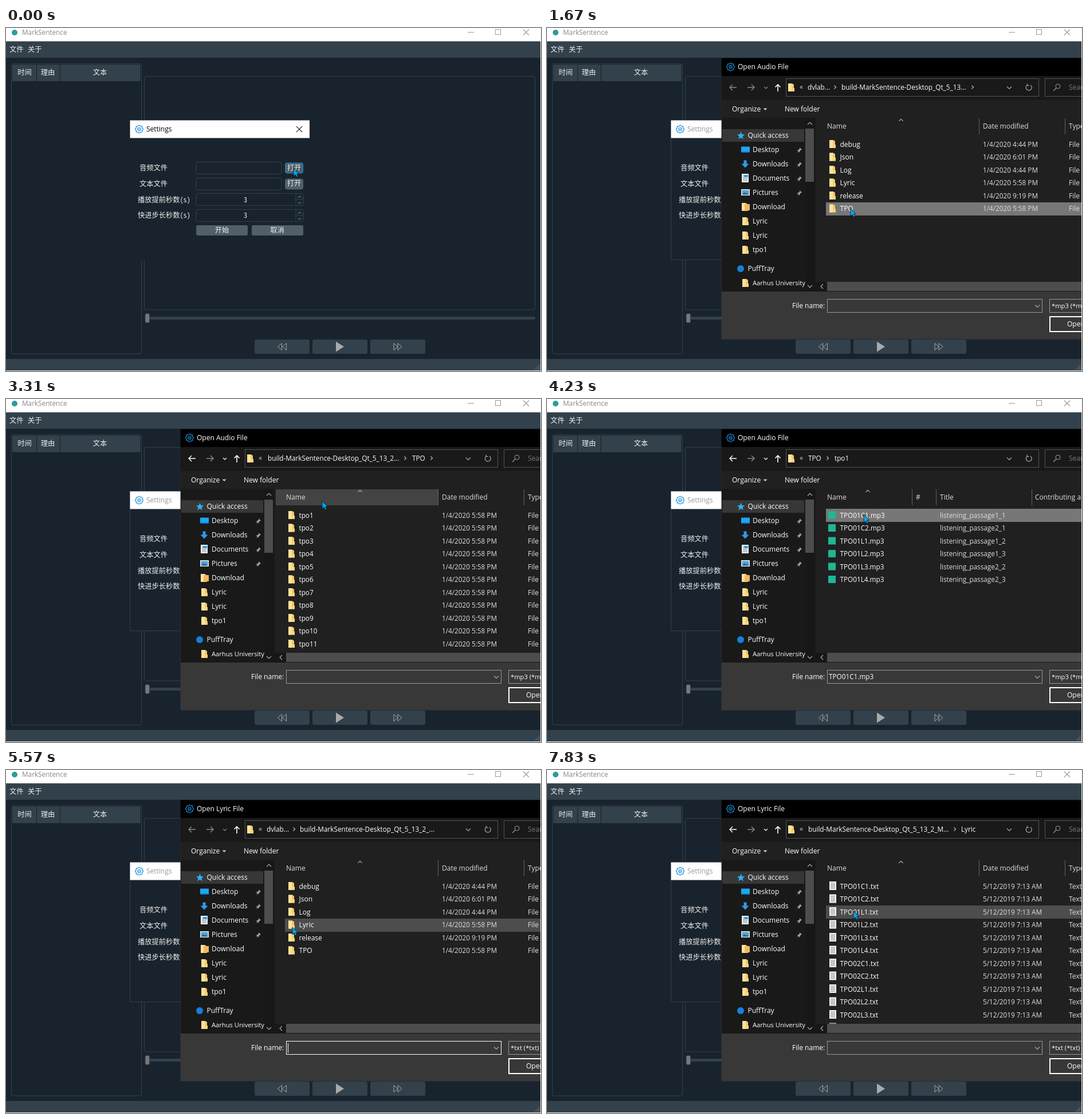
These frames come from a looping animation (934 by 600 pixels, 7.99 s). An HTML page:

```html
<!DOCTYPE html>
<html lang="en">
<head>
<meta charset="utf-8">
<title>MarkSentence</title>
<style>
html, body { margin: 0; width: 100%; height: 100%; overflow: hidden; background: #19232d; }
svg { display: block; }
text { font: 12px "Open Sans", "Noto Sans", sans-serif; fill: #fff; white-space: pre; }
.d { font-size: 11.75px; }
.n { font-size: 11.2px; }
.cjk { font: 12.25px "Noto Sans Mono CJK SC", "Noto Sans CJK SC", "Noto Sans CJK", monospace; fill: #f0f0f0; }
.mid { text-anchor: middle; }
</style>
</head>
<body>
<svg id="stage" width="934" height="600" viewBox="0 0 934 600">
  <defs>
    <clipPath id="list"><rect x="469" y="186" width="464" height="257.5"/></clipPath>
    <clipPath id="nav"><rect x="305" y="158" width="146" height="303"/></clipPath>
    <clipPath id="window"><rect width="933" height="599"/></clipPath>
  </defs>
  <g id="main"></g>
  <g clip-path="url(#window)"><g id="settings"></g><g id="dialog"></g></g>
  <path id="cursor" d="M0 0V13L3 10.3 5.2 14.6 7.6 13.4 5.6 9.3H9.6Z" fill="#00a8f3" stroke="#0b1a26" stroke-width=".8"/>
</svg>
<script>
const LOOP = 7990;
const $ = id => document.getElementById(id);

const text = (x, cy, s, cls = '', fill = '') =>
  `<text x="${x}" y="${Math.round(cy + 4.3)}" class="${cls}"${fill && ` style="fill:${fill}"`}>${s}</text>`;
const box = (x, y, w, h, fill, stroke = 'none', r = 0, sw = 1) =>
  `<rect x="${x}" y="${y}" width="${w}" height="${h}" rx="${r}" fill="${fill}" stroke="${stroke}" stroke-width="${sw}"/>`;
const line = (d, stroke, sw = 1, fill = 'none') =>
  `<path d="${d}" fill="${fill}" stroke="${stroke}" stroke-width="${sw}"/>`;
const shape = (d, fill) => `<path d="${d}" fill="${fill}"/>`;
const cross = (x, y, r, c) => line(`M${x - r} ${y - r}l${2 * r} ${2 * r}m0 ${-2 * r}l${-2 * r} ${2 * r}`, c, 1.1);
const chevron = {
  down: (x, y, c, r = 4) => line(`M${x - r} ${y - r / 2}l${r} ${r}l${r} ${-r}`, c, 1.2),
  up: (x, y, c, r = 4) => line(`M${x - r} ${y + r / 2}l${r} ${-r}l${r} ${r}`, c, 1.2),
  left: (x, y, c, r = 4) => line(`M${x + r / 2} ${y - r}l${-r} ${r}l${r} ${r}`, c, 1.2),
  right: (x, y, c, r = 3) => line(`M${x - r / 2} ${y - r}l${r} ${r}l${-r} ${r}`, c, 1.2)
};

function gear(x, y) {
  let d = '';
  for (let i = 0; i <= 64; i++) {
    const a = i * Math.PI / 32, r = 6.3 + .7 * Math.cos(8 * a);
    d += (i ? 'L' : 'M') + (x + r * Math.cos(a)).toFixed(1) + ' ' + (y + r * Math.sin(a)).toFixed(1);
  }
  return line(d + 'Z', '#1a8fd8', 1.2) +
    `<circle cx="${x}" cy="${y}" r="2.7" fill="none" stroke="#1a8fd8" stroke-width="1.1"/>` +
    `<circle cx="${x}" cy="${y}" r="1" fill="#1a8fd8"/>`;
}
const folder = (x, cy) =>
  shape(`M${x} ${cy - 7}h7l3 2v12h-10z`, '#f0c96c') + shape(`M${x} ${cy - 7}h6v14h-6z`, '#ffe299') +
  shape(`M${x + 7} ${cy + 1}h4v6h-4z`, '#f8d681');
const page = (x, cy) => {
  let s = box(x, cy - 8, 12, 15, '#f4f4f4');
  for (let i = 0; i < 5; i++) s += box(x + 2, cy - 5.5 + i * 2.3, 8, 1, '#8d8d8d');
  return s;
};

function mainWindow() {
  const P = '#32414b', G = '#999';
  let s = box(0, 0, 934, 600, '#19232d') + box(0, 0, 934, 23.4, '#fff') +
    '<circle cx="15" cy="8" r="5" fill="#2b9c9c"/>' + text(28, 8, 'MarkSentence', 'd', '#888') +
    line('M806 7.5h11', G) + box(854.5, 2.5, 9, 9, 'none', G) + cross(908, 7.5, 5, G) +
    box(0, 24, 934, 28, P) + text(6, 38, '文件', 'cjk') + text(38, 38, '关于', 'cjk') +
    box(9.5, 62.5, 227, 507.5, 'none', P, 3) +
    box(11, 64, 42, 29, P) + box(54, 64, 39.5, 29, P) + box(94.5, 64, 140, 29, P) +
    text(32.5, 78, '时间', 'cjk mid') + text(73, 78, '理由', 'cjk mid') + text(164, 78, '文本', 'cjk mid') +
    box(241.5, 84.5, 682, 408.5, 'none', P, 3) +
    box(245, 505, 679, 5, P, 'none', 2) + box(243, 499.5, 7.5, 16, '#787878', P, 2.5) +
    box(0, 579, 934, 21, P) + line('M923 598l9-9m-6 9l6-6m-3 6l3-3', '#65727b');
  for (const x of [434, 535, 636]) s += box(x, 545, 96, 25, P, 'none', 3);
  return s + line('M481.500 551.500l-7 6 7 6zm8 0l-7 6 7 6z', '#a3a8ab') +
    shape('M576 548.5v18l14-9z', '#aaa') +
    line('M677 551.500l7 6-7 6zm7 0l7 6-7 6z', '#a3a8ab') +
    box(933, 0, 1, 600, '#eee') + box(0, 599, 934, 1, '#eee');
}

function settings(active, audio, x, y) {
  const E = '#32414b', B = '#505f69';
  let s = box(216.5, 162.5, 313, 243, '#19232d', active ? '#17212a' : '#303e49') +
    box(216.5, 161.5, 313.5, 31, '#fff') + gear(232.5, 177) +
    text(245, 177, 'Settings', '', active ? '#000' : '#999') + cross(512, 177, 5, active ? '#222' : '#999');
  [[233, '音频文件'], [233, '文本文件'], [230, '播放提前秒数(s)'], [230, '快进步长秒数(s)']].forEach(([lx, label], i) => {
    const cy = 245 + i * 27.6, top = Math.round(cy) - 10.5;
    s += text(lx, cy, label, 'cjk');
    if (i < 2) {
      const hot = active && x > 486 && x < 520 && Math.abs(y - cy) < 10;
      s += box(332, top, 149, 21, '#19232d', E, 3) +
        box(487.5, top + 1.5, 31, 18, B, hot ? '#148cd2' : B, 3) + text(503, cy - .5, '打开', 'cjk mid');
    } else {
      s += box(332, top, 187, 21, '#19232d', E, 3) + line(`M506 ${top}v21m0-10.5h13`, E) +
        text(418, cy, '3', 'cjk mid') +
        shape(`M508.5 ${top + 7}l4-4 4 4zm0 8l4 4 4-4z`, '#43515b');
    }
  });
  if (audio) s += text(336, 245, 'ug/TPO/tpo1/TPO01C1.mp3', 'cjk');
  return s + box(332, 345, 90, 18, B, 'none', 3) + box(429, 345, 90, 18, B, 'none', 3) +
    text(377, 353.5, '开始', 'cjk mid') + text(473.5, 353.5, '取消', 'cjk mid');
}

const build = 'build-MarkSentence-Desktop_Qt_5_13';
const crumbs = {
  root: [[455, 'dvlab...'], [503], [513, build + '_2_...']],
  root2: [[455, 'dvlab...'], [503], [514, build + '...'], [743]],
  tpo: [[457, build + '_2...'], [697], [709, 'TPO'], [743]],
  tpo1: [[456, 'TPO'], [490], [502, 'tpo1']],
  lyric: [[456, build + '_2_M...'], [712], [723, 'Lyric']]
};
const rootDates = ['4:44', '6:01', '4:44', '5:58', '9:19', '5:58'];
const rootRows = ['debug', 'Json', 'Log', 'Lyric', 'release', 'TPO']
  .map((n, i) => [n, `1/4/2020 ${rootDates[i]} PM`]);
const tracks = ['C1', 'C2', 'L1', 'L2', 'L3', 'L4'];
const passages = ['1_1', '2_1', '1_2', '1_3', '2_2', '2_3'];
const rows = {
  root: rootRows,
  root2: rootRows,
  tpo: Array.from({ length: 11 }, (_, i) => ['tpo' + (i + 1), '1/4/2020 5:58 PM']),
  tpo1: tracks.map((n, i) => [`TPO01${n}.mp3`, 'listening_passage' + passages[i]]),
  lyric: Array.from({ length: 12 }, (_, i) =>
    [`TPO0${1 + Math.floor(i / 6)}${tracks[i % 6]}.txt`, '5/12/2019 7:13 AM'])
};

function fileList(view, x, y, o) {
  const audio = view === 'tpo1', lyric = view === 'lyric';
  let s = box(469, 157, 464, 304, '#202020');
  if (y > 158 && y < 187) s += box(471, 158, 283, 28, '#434343');
  const heads = audio ? [[489, 'Name'], [644, '#'], [686, 'Title'], [852, 'Contributing artists']]
    : [[489, 'Name'], [761, 'Date modified'], [911, 'Type']];
  heads.forEach(([hx, h]) => s += text(hx, 172, h, '', '#dedede'));
  for (const lx of audio ? [637.5, 679.5, 846.5] : [754.5, 904.5]) s += line(`M${lx} 158v28`, '#636363');
  s += chevron.up(audio ? 560 : 618, 161, '#aaa', 3.5);
  if (!o.blank) {
    const hot = o.nohover ? -1 : Math.round((y - 203.5) / 22.5);
    s += '<g clip-path="url(#list)">';
    rows[view].forEach(([name, info], i) => {
      const cy = 203.5 + i * 22.5;
      if (i === o.sel || i === hot)
        s += box(487, Math.round(cy - 11.5), 447, 23, i === o.sel ? '#777' : '#4d4d4d');
      s += audio ? box(491, cy - 7, 13, 13, '#1fb794') : lyric ? page(493, cy - .5) : folder(493, cy - .5);
      s += text(511.5, cy, name, /\d/.test(name) ? 'd' : '');
      s += text(audio ? 686 : 761, cy, info, 'd', '#dedede');
      if (!audio) s += text(911, cy, lyric ? 'Text Document' : 'File folder', '', '#dedede');
    });
    s += '</g>';
  }
  return s + box(469, 444, 464, 17, '#171717') + box(489, 444, 444, 16, '#4d4d4d') +
    chevron.left(480, 452, '#aaa');
}

function navPane() {
  const blue = '#2f9bea';
  let s = box(305, 157, 164, 304, '#191919') + box(306, 177, 143, 22, '#373737') +
    shape('M338.500 181.500l1.900 4.500 4.800.4-3.700 3.100 1.200 4.800-4.200-2.600-4.200 2.600 1.200-4.800-3.700-3.100 4.800-.4z', '#2bb0f5') +
    text(350.5, 188, 'Quick access');
  ['Desktop', 'Downloads', 'Documents', 'Pictures', 'Download', 'Lyric', 'Lyric', 'tpo1'].forEach((n, i) => {
    const cy = 213 + 25 * i;
    s += text(359, cy, n);
    if (i < 4) s += shape(`M441 ${cy - 4}l4 4-2 .5-2 2.500v2l-2-2-3 3 2.500-3.500-2-2h2l2.500-2z`, '#a5a5a5');
    if (i > 4) s += folder(341, cy);
  });
  s += box(339, 207.500, 15, 10, '#1ea7f2') + box(339, 216, 15, 2, '#1178bd') +
    shape('M343.500 231.500h5v6h4l-6.500 7-6.500-7h4z', blue) +
    page(340, 263) + box(344, 257, 7, 4, blue) +
    box(339, 282, 15, 11, '#e8eef2') + box(340.500, 283.500, 12, 8, '#4ba4d8') +
    shape('M340.500 291.500l4-4 3 2 2-1 3 3z', '#35606e') +
    folder(340, 313) + box(345, 308, 9, 11, '#f2b761') +
    '<circle cx="338" cy="421" r="6" fill="#1480d8"/>' + text(350.5, 421, 'PuffTray') +
    folder(341, 446) + `<g clip-path="url(#nav)">${text(359, 446, 'Aarhus University', 'n')}</g>`;
  return s + box(451, 158, 16, 303, '#171717') + box(451, 176, 15, 93, '#4d4d4d') +
    chevron.up(459, 167, '#aaa') + chevron.down(459, 452, '#aaa');
}
const navMarkup = navPane();

function dialog(view, x, y, o) {
  const lyricFile = o.kind === 'Lyric', isRoot = view.startsWith('root');
  const back = isRoot ? '#8a8a8a' : '#fff', focus = isRoot && o.sel == null;
  let s = box(304.5, 52.5, 630, 492, '#383838') + box(304.5, 52.5, 630, 31.5, '#000') + gear(320.5, 68) +
    text(333, 68, `Open ${o.kind} File`) +
    box(304.5, 84, 630, 42, '#191919') + box(304.5, 126, 630, 31, '#202020') +
    line('M331 104h-12m5-5l-5 5 5 5', back, 1.4) + line('M350 104h12m-5-5l5 5-5 5', '#8a8a8a', 1.4) +
    chevron.down(382, 104.5, back, 3) + line('M403 111v-12m-4.500 4.500l4.500-4.500 4.500 4.500', '#fff', 1.6) +
    box(417.5, 88.5, 441, 31, '#191919', '#535353') + folder(421, 104) + text(441, 103, '«', '', '#ccc');
  for (const [cx, name] of crumbs[view]) s += name ? text(cx, 104, name, 'd') : chevron.right(cx, 103.5, '#bbb');
  s += chevron.down(807, 104.5, '#aaa') +
    line('M838.500 100a5 5 0 1 0 5.500 0m-5.800-2.500v3.200h3.200', '#aaa', 1.2) +
    box(869.5, 88.5, 80, 31, '#191919', '#535353') +
    '<circle cx="892" cy="102" r="4" fill="none" stroke="#999"/>' + line('M889 105l-5 5', '#999', 1.2) +
    text(911, 104, 'Search', '', '#777') +
    text(323, 142, 'Organize') + shape('M377.500 140.500h7l-3.500 3.500z', '#ccc') + text(415, 142, 'New folder');
  s += navMarkup + fileList(view, x, y, o);
  s += text(428, 486, 'File name:') +
    box(489.5, 474.5, 375, 23, '#383838', focus ? '#fff' : '#999') + chevron.down(856, 486.5, '#aaa') +
    (o.file ? text(492, 486, o.file, 'd') : '') + (focus && o.caret ? line('M492.500 478v17', '#fff') : '') +
    box(877.5, 474.5, 80, 23, '#383838', '#999') + text(881, 486, lyricFile ? '*txt (*txt)' : '*mp3 (*mp3)', 'n') +
    box(878, 505, 80, 26, '#383838', '#fff', 0, 2) + text(908, 518, 'Open');
  return `<g opacity="${o.fade || 1}">${s}</g>`;
}

// [start ms, view, pointer x, pointer y, options]
const A = 'Audio', L = 'Lyric', first = 'TPO01C1.mp3';
const steps = [
  [0, 'settings', 502, 246],
  [270, 'settings', 502, 246, { idle: true }],
  [410, 'root', 502, 246, { kind: A, blank: true, fade: .6 }],
  [550, 'root', 502, 246, { kind: A, blank: true }],
  [700, 'root', 502, 246, { kind: A, nohover: true }],
  [840, 'root', 502, 246, { kind: A, caret: true }],
  [1120, 'root2', 508, 264, { kind: A, caret: true }],
  [1260, 'root2', 520, 290, { kind: A }],
  [1390, 'root2', 528, 314, { kind: A }],
  [1670, 'root2', 530, 316, { kind: A, sel: 5 }],
  [1840, 'tpo', 530, 316, { kind: A, blank: true }],
  [2010, 'tpo', 530, 316, { kind: A, nohover: true }],
  [2190, 'tpo', 532, 318, { kind: A }],
  [2620, 'tpo', 541, 336, { kind: A }],
  [2750, 'tpo', 545, 354, { kind: A }],
  [2890, 'tpo', 546, 336, { kind: A }],
  [3030, 'tpo', 548, 290, { kind: A }],
  [3165, 'tpo', 550, 234, { kind: A }],
  [3300, 'tpo', 552, 179, { kind: A }],
  [3440, 'tpo', 553, 196, { kind: A }],
  [3580, 'tpo', 553, 203, { kind: A }],
  [3710, 'tpo', 553, 203, { kind: A, sel: 0 }],
  [3880, 'tpo1', 553, 203, { kind: A, blank: true }],
  [4050, 'tpo1', 553, 203, { kind: A }],
  [4230, 'tpo1', 553, 203, { kind: A, sel: 0, file: first }],
  [4380, 'settings', 553, 203, { audio: true }],
  [4690, 'settings', 540, 228, { audio: true }],
  [4830, 'settings', 512, 262, { audio: true }],
  [4970, 'settings', 500, 275, { audio: true }],
  [5120, 'settings', 500, 275, { audio: true, idle: true }],
  [5270, 'root', 500, 275, { kind: L, blank: true, fade: .6 }],
  [5430, 'root', 500, 275, { kind: L, nohover: true }],
  [5570, 'root', 500, 275, { kind: L, caret: true }],
  [5820, 'root2', 506, 282, { kind: L, caret: true }],
  [5955, 'root2', 514, 296, { kind: L }],
  [6090, 'root2', 522, 312, { kind: L }],
  [6230, 'root2', 526, 294, { kind: L }],
  [6360, 'root2', 528, 273, { kind: L, caret: true }],
  [6650, 'root2', 530, 254, { kind: L }],
  [6780, 'root2', 532, 234, { kind: L }],
  [6905, 'root2', 532, 230, { kind: L, caret: true }],
  [7030, 'root2', 533, 247, { kind: L, caret: true }],
  [7150, 'root2', 535, 268, { kind: L, caret: true }],
  [7430, 'root2', 535, 268, { kind: L, sel: 3 }],
  [7565, 'lyric', 535, 268, { kind: L, blank: true }],
  [7700, 'lyric', 535, 268, { kind: L }],
  [7830, 'lyric', 535, 247, { kind: L }]
];

$('main').innerHTML = mainWindow();
let shown = -1;
function draw(now) {
  const t = now % LOOP;
  let i = steps.length - 1;
  while (i && steps[i][0] > t) i--;
  if (i !== shown) {
    shown = i;
    const [, view, x, y, o = {}] = steps[i], open = view !== 'settings';
    $('settings').innerHTML = settings(!open && !o.idle, o.audio || o.kind === L, x, y);
    $('dialog').innerHTML = open ? dialog(view, x, y, o) : '';
    $('cursor').setAttribute('transform', `translate(${x} ${y})`);
  }
}
const start = performance.now();
function tick() {
  draw(performance.now() - start);
  requestAnimationFrame(tick);
}
tick();
</script>
</body>
</html>
```
